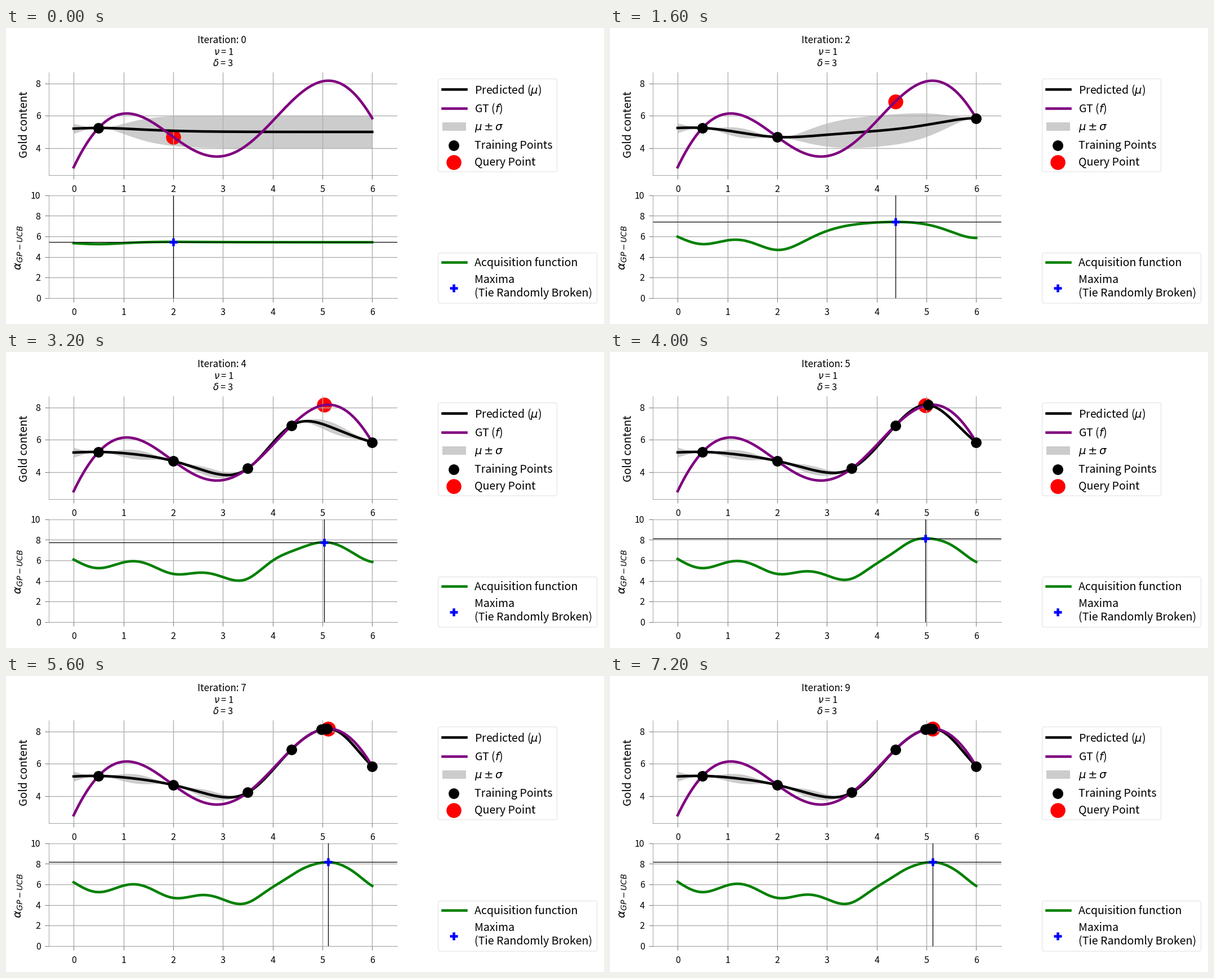
Write a matplotlib script that moves like this. It is 1062x527 px and loops after 8 s.

```python
import numpy as np
import matplotlib.pyplot as plt
from matplotlib.animation import FuncAnimation
from matplotlib.patches import FancyBboxPatch, Rectangle

W, H, DPI = 1062, 527, 100
PT = 72 / DPI
plt.rcParams["font.family"] = "Noto Sans CJK JP"
plt.rcParams["mathtext.fontset"] = "dejavusans"

# Ground truth: smooth polynomial through a few readings
KNOTS_X = [0, .25, .5, .8, 1.07, 1.5, 2, 2.45, 2.87, 3.5, 4, 4.375, 4.75,
           5.11, 5.5, 6]
KNOTS_Y = [2.82, 4.23, 5.24, 5.955, 6.155, 5.715, 4.7, 3.83, 3.475, 4.205,
           5.7, 6.873, 7.79, 8.17, 7.735, 5.85]
gold = np.polynomial.Polynomial.fit(KNOTS_X, KNOTS_Y, 8)

START = 0.5
QUERIES = [2.005, 6, 4.375, 3.497, 5.03, 4.98, 5.09, 5.11, 5.115, 5.122]
NU, DELTA, PRIOR = 1, 3, 5
xs = np.linspace(0, 6, 601)


def matern(a, b):
    s = np.sqrt(5) * np.abs(np.subtract.outer(a, b))
    return (1 + s + s ** 2 / 3) * np.exp(-s)


def posterior(tx):
    k = matern(tx, tx) + 1e-6 * np.eye(len(tx))
    ks = matern(xs, tx)
    mean = PRIOR + ks @ np.linalg.solve(k, gold(tx) - PRIOR)
    var = 1 - np.sum(ks * np.linalg.solve(k, ks.T).T, axis=1)
    return mean, np.clip(var, 0, None)


def ucb_weight(t):
    tau = 2 * np.log(t ** 2.5 * np.pi ** 2 / (3 * DELTA))
    return np.sqrt(NU * tau)


fig = plt.figure(figsize=(W / DPI, H / DPI), dpi=DPI, facecolor="white")
page = fig.add_axes([0, 0, 1, 1], zorder=5)
page.set(xlim=(0, W), ylim=(H, 0))
page.axis("off")


def label(x, y, s, px, **kw):
    return page.text(x, y, s, fontsize=px * PT,
                     **{"va": "baseline", "ha": "left", **kw})


def panel(top, bottom, ylim, yticks):
    left, right = 76, 694.5
    ax = fig.add_axes([left / W, 1 - bottom / H, (right - left) / W,
                       (bottom - top) / H])
    ax.set(xlim=(-.5, 6.5), ylim=ylim, xticks=range(7), yticks=yticks)
    ax.grid(color="#b0b0b0", lw=1)
    ax.tick_params(color="gray", length=4.7, width=.8,
                   labelbottom=False, labelleft=False)
    for side in ("top", "right"):
        ax.spines[side].set_visible(False)
    for side in ("left", "bottom"):
        ax.spines[side].set(color="gray", linewidth=.5)
    for v in range(7):
        x = left + (v + .5) / 7 * (right - left)
        label(x, bottom + 30, str(v), 16, ha="center")
    for v in yticks:
        y = bottom - (v - ylim[0]) / (ylim[1] - ylim[0]) * (bottom - top)
        label(61.5, y + 6.2, str(v), 16, ha="right")
    return ax


LINE = dict(lw=3.3, solid_capstyle="projecting")
TRAIN = dict(marker="o", color="black", ms=18.9 * PT, mew=0, ls="")
QUERY = dict(marker="o", color="red", ms=26.5 * PT, mew=0, ls="")
PEAK = dict(marker="+", color="blue", ms=13.3 * PT, mew=3.3, ls="")
BAND = "#cccccc"

top = panel(79.5, 262, (2.33, 8.66), [4, 6, 8])
low = panel(297.8, 480.8, (0, 10), range(0, 11, 2))

band = top.fill_between(xs, xs, xs, color=BAND, lw=0, zorder=1)
query, = top.plot([], [], zorder=1.2, **QUERY)
mean_line, = top.plot([], [], color="black", **LINE)
top.plot(xs, gold(xs), color="purple", **LINE)
train, = top.plot([], [], zorder=10, **TRAIN)

acq_line, = low.plot([], [], color="green", **LINE)
hline = low.axhline(0, color="black", lw=.9)
vline = low.axvline(0, color="black", lw=.9)
peak, = low.plot([], [], zorder=10, **PEAK)

# Titles and axis names
title = label(383.5, 27, "", 17, ha="center")
label(386.5, 48, r"$\nu$ = 1", 16.5, ha="center")
label(385.5, 68.5, r"$\delta$ = 3", 16.5, ha="center")
label(38.5, 171.5, "Gold content", 19.6, ha="center", rotation=90,
      rotation_mode="anchor")
label(28, 431, r"$\alpha_{GP-UCB}$", 20, rotation=90, rotation_mode="anchor")


def legend_box(x0, y0, x1, y1):
    page.add_patch(FancyBboxPatch(
        (x0 + 4, y0 + 4), x1 - x0 - 8, y1 - y0 - 8,
        boxstyle="round,pad=4,rounding_size=4", fc="white", ec="#e6e6e6",
        lw=.9))


def legend_line(y, color):
    page.plot([775, 817], [y, y], color=color, **LINE)


legend_box(767.5, 90.5, 978.5, 256)
legend_line(109.4, "black")
legend_line(142.9, "purple")
page.add_patch(Rectangle((775, 167.5), 41.5, 15, fc=BAND, lw=0))
page.plot(795.4, 208.7, **TRAIN)
page.plot(795.4, 238.9, **QUERY)
legend_box(767.5, 400.5, 1049.5, 490)
legend_line(417.2, "green")
page.plot(795.4, 462.9, **PEAK)
for y, s in [(116.6, r"Predicted ($\mu$)"), (150, r"GT ($f$)"),
             (182.5, r"$\mu\pm\sigma$"), (214.5, "Training Points"),
             (244.8, "Query Point"), (424.2, "Acquisition function"),
             (454.5, "Maxima"), (478.3, "(Tie Randomly Broken)")]:
    label(832, y, s, 19.6)


def update(i):
    tx = np.array([START] + QUERIES[:i])
    mean, var = posterior(tx)
    acq = mean + ucb_weight(i + 1) * var
    q = QUERIES[i]
    best = np.interp(q, xs, acq)

    title.set_text(f"Iteration: {i}")
    band.set_verts([np.column_stack([np.r_[xs, xs[::-1]],
                                     np.r_[mean + var, (mean - var)[::-1]]])])
    mean_line.set_data(xs, mean)
    train.set_data(tx, gold(tx))
    query.set_data([q], [gold(q)])
    acq_line.set_data(xs, acq)
    hline.set_ydata([best, best])
    vline.set_xdata([q, q])
    peak.set_data([q], [best])


anim = FuncAnimation(fig, update, frames=len(QUERIES), interval=800,
                     init_func=lambda: update(0), repeat=True, repeat_delay=0)
plt.show()
```
